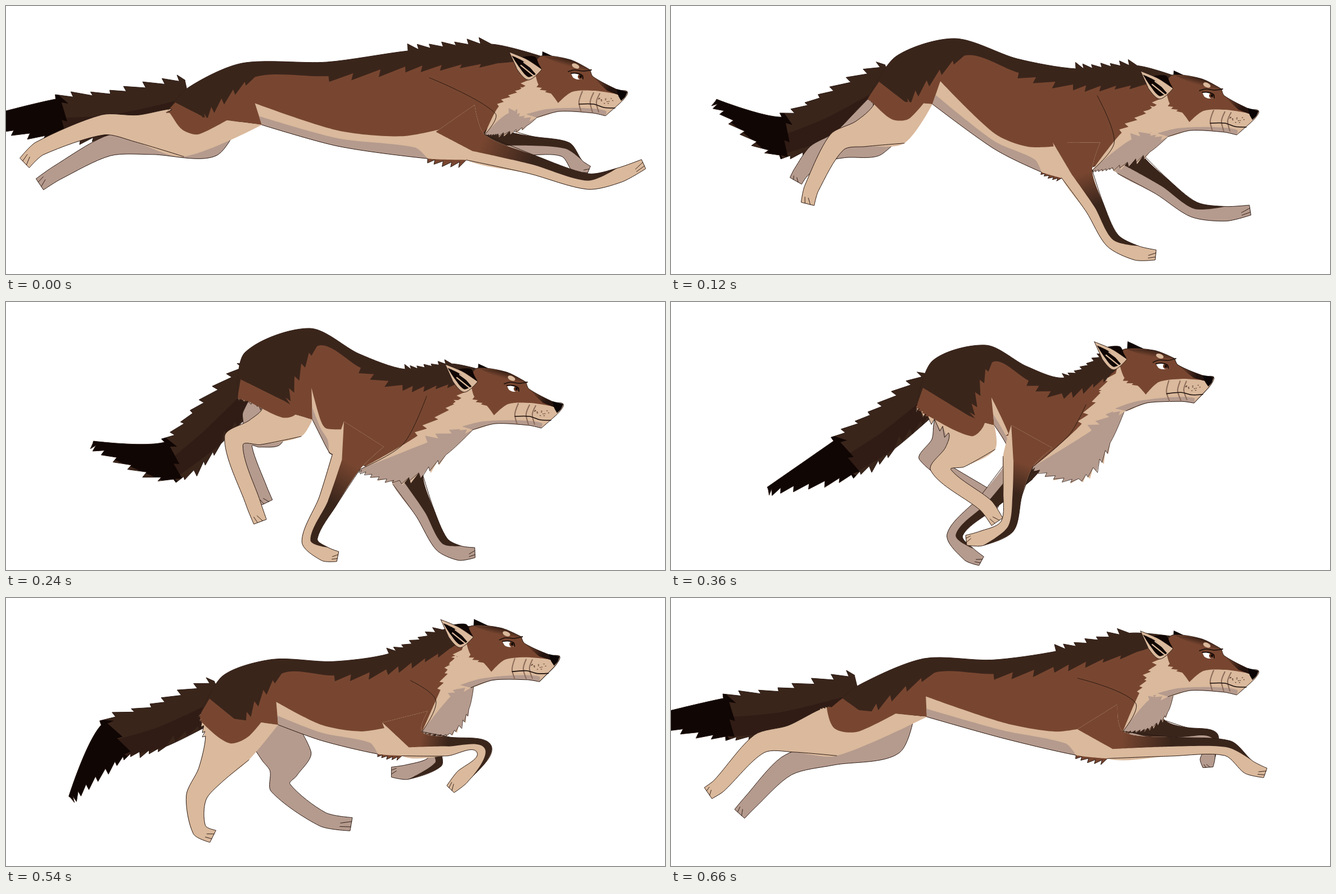
Write an HTML page with a canvas that moves like this. It is 1172x478 px and loops after 0.72 s.

```html
<!DOCTYPE html>
<html lang="en">
<head>
<meta charset="utf-8">
<title>Running wolf</title>
<style>
html, body { margin: 0; width: 100%; height: 100%; overflow: hidden; background: #fff; }
canvas { display: block; }
</style>
</head>
<body>
<canvas id="stage" width="1172" height="478"></canvas>
<script>
const ctx = document.getElementById('stage').getContext('2d');
const BROWN = '#784630', DARK = '#3a251b', CREAM = '#dab99c', SHADE = '#b59b8e', BLACK = '#100604', LINE = '#2b1a13';
const STEP = 60, STEPS = 12;

const parse = row => row.split(' ').map(p => p.split(',').map(Number));
const parseAll = rows => Object.fromEntries(Object.entries(rows).map(([name, row]) => [name, parse(row)]));

// A joint's path through the stride: seven keys, the first six two steps apart.
const body = parseAll({
  rump: '285,190 350,165 412,170 437,185 395,195 300,215 285,195',
  hip: '325,145 400,90 425,90 465,105 425,125 350,150 335,155',
  loin: '420,102 505,58 540,47 560,77 500,97 455,118 450,108',
  withers: '715,80 720,112 710,120 700,135 690,102 675,100 685,95',
  belly: '590,250 575,255 560,240 600,262 590,252 540,257 590,250',
  groin: '455,212 465,175 545,210 575,220 525,232 450,218 455,212',
  ruff: '875,228 785,288 700,318 725,315 770,258 808,232 848,232',
  eye: '1017,126 957,160 903,155 875,115 878,83 917,88 957,103'
});
const tail = parseAll({
  bend: '90,200 195,232 290,283 305,278 255,265 125,242 95,213',
  tip: '-60,205 80,168 155,250 172,332 190,380 25,312 -50,215'
});
const nearFore = parseAll({
  elbow: '835,252 722,300 605,285 617,285 700,255 740,268 790,262',
  wrist: '1035,313 785,418 540,425 598,400 808,305 880,248 990,268',
  toe: '1134,282 862,444 590,454 525,425 743,362 838,326 1057,312'
});
const farFore = parseAll({
  elbow: '870,242 815,280 715,318 620,300 700,270 805,245 870,245',
  wrist: '995,256 930,363 775,432 505,415 695,320 822,275 960,250',
  toe: '1036,294 1030,364 834,447 552,462 608,312 778,325 955,302'
});
const nearHind = parseAll({
  knee: '305,226 388,210 490,213 535,248 490,272 300,258 280,240',
  hock: '172,212 295,243 405,248 480,300 480,365 192,330 157,260',
  ankle: '60,254 250,325 440,360 560,363 535,440 148,372 85,335',
  toe: '33,280 243,353 452,392 580,392 592,448 134,390 66,348'
});
const farHind = parseAll({
  knee: '350,230 350,228 455,225 505,240 580,270 405,285 375,245',
  hock: '180,250 258,265 420,252 460,280 597,318 345,348 205,300',
  ankle: '90,298 230,298 452,335 555,342 690,350 388,430 140,365',
  toe: '60,318 222,312 463,358 585,360 725,362 445,438 122,385'
});

const mix = (a, b, t) => [a[0] + (b[0] - a[0]) * t, a[1] + (b[1] - a[1]) * t];
const shift = (p, x, y) => [p[0] + x, p[1] + y];
const unit = (a, b) => {
  const len = Math.hypot(b[0] - a[0], b[1] - a[1]) || 1;
  return [(b[0] - a[0]) / len, (b[1] - a[1]) / len];
};
const noise = n => Math.abs(Math.sin(n * 12.9898) * 43758.5453) % 1;

function sample(tracks, step) {
  const exact = step % 2 === 0 || step === STEPS - 1;
  const k = Math.ceil((step - 1) / 2) + (step === STEPS - 1 ? 1 : 0);
  return Object.fromEntries(Object.entries(tracks).map(([name, keys]) => {
    const key = i => keys[(i + keys.length) % keys.length];
    const between = d => 0.5625 * (key(k)[d] + key(k + 1)[d]) - 0.0625 * (key(k - 1)[d] + key(k + 2)[d]);
    return [name, exact ? key(k) : [between(0), between(1)]];
  }));
}

// Offsets a chain of joints to both sides, left of travel first.
function ribbon(joints, widths) {
  const side = sign => joints.map((p, i) => {
    const before = i ? unit(joints[i - 1], p) : [0, 0];
    const after = i < joints.length - 1 ? unit(p, joints[i + 1]) : [0, 0];
    const d = unit([0, 0], [before[0] + after[0], before[1] + after[1]]);
    return shift(p, d[1] * widths[i] * sign, -d[0] * widths[i] * sign);
  });
  return [side(1), side(-1)];
}
const outline = ([front, back]) => [...front, ...back.slice().reverse()];

// Mask per point: '-' corner, '.' smooth, digit = fur leaning ahead, letter = fur leaning back.
function trace(pts, mask, open) {
  const n = pts.length, path = new Path2D();
  const at = i => pts[(i + n) % n];
  const dir = i => {
    const j = i % n;
    if (mask[j] === '-' || (open && (j === 0 || j === n - 1))) return [0, 0];
    return unit(at(j - 1), at(j + 1));
  };
  path.moveTo(...pts[0]);
  for (let i = 0; i < n - (open ? 1 : 0); i++) {
    const a = at(i), b = at(i + 1), len = Math.hypot(b[0] - a[0], b[1] - a[1]);
    const d = unit(a, b), da = dir(i), db = dir(i + 1);
    const c1 = shift(a, da[0] * len * 0.28, da[1] * len * 0.28);
    const c2 = shift(b, -db[0] * len * 0.28, -db[1] * len * 0.28);
    const type = mask[i] || '.';
    if (type === '.' || type === '-') { path.bezierCurveTo(...c1, ...c2, ...b); continue; }
    const ahead = type <= '9';
    const count = ahead ? +type : type.charCodeAt(0) - 96;
    const on = t => mix(mix(mix(a, c1, t), mix(c1, c2, t), t), mix(mix(c1, c2, t), mix(c2, b, t), t), t);
    for (let k = 0; k < count; k++) {
      const height = Math.min(12, len / count * 0.7) * (0.5 + 0.6 * noise(i * 9 + k + 1));
      const tip = on(Math.min(1, Math.max(0, (k + 0.5 + (ahead ? 0.6 : -0.6)) / count)));
      path.lineTo(...shift(tip, d[1] * height, -d[0] * height));
      path.lineTo(...on((k + 1) / count));
    }
  }
  if (!open) path.closePath();
  return path;
}

function fill(pts, mask, color, clip) {
  ctx.save();
  if (clip) ctx.clip(clip);
  ctx.fillStyle = color;
  const path = trace(pts, mask);
  ctx.fill(path);
  ctx.restore();
  return path;
}

function line(pts, mask = '', color = LINE, width = 1) {
  ctx.strokeStyle = color;
  ctx.lineWidth = width;
  ctx.stroke(trace(pts, mask, true));
}

function fade(a, b, from, to) {
  const gradient = ctx.createLinearGradient(...a, ...b);
  gradient.addColorStop(0, from);
  gradient.addColorStop(1, to);
  return gradient;
}

function toes(front, back, heel) {
  for (const t of [0.3, 0.7]) {
    const p = mix(front, back, t);
    line([p, mix(p, heel, 0.35)]);
  }
}

function foreLeg({ elbow, wrist, toe }, withers) {
  const paw = shift(mix(wrist, toe, 0.6), -3, 7);
  return ribbon([mix(elbow, withers, 0.3), elbow, mix(elbow, wrist, 0.5), wrist, paw, toe], [42, 28, 17, 14, 13, 9]);
}

function hindLeg({ knee, hock, ankle, toe }, root) {
  return ribbon([root, knee, mix(knee, hock, 0.55), hock, ankle, toe], [42, 44, 24, 18, 13, 12]);
}

function buildPose(step) {
  const b = sample(body, step), t = sample(tail, step);
  const { rump, loin, withers, belly, groin, ruff, eye } = b;
  const hipJoint = [(rump[0] + loin[0] + groin[0]) / 3, (rump[1] + loin[1] + groin[1]) / 3];
  const nearKnee = sample(nearHind, step);
  const fore = foreLeg(sample(nearFore, step), withers);
  const crown = shift(eye, -55, -33), throat = shift(eye, -62, 62);
  const nape = shift(mix(withers, crown, 0.6), 0, (withers[0] - crown[0]) * 0.08);
  const [elbowFront, elbowBack] = [fore[0][1], fore[1][1]];
  const tailRoot = mix(rump, loin, 0.3);
  const tailMid = shift(mix(tailRoot, t.bend, 0.55), -5, 10);
  return {
    ...b, hipJoint, crown, throat, nape, fore, elbowFront, elbowBack, tailJoints: [tailRoot, tailMid, t.bend, t.tip],
    knee: nearKnee.knee,
    hind: hindLeg(nearKnee, hipJoint),
    farHind: hindLeg(sample(farHind, step), hipJoint),
    farFore: foreLeg(sample(farFore, step), withers),
    mid: shift(mix(loin, withers, 0.5), 3, 9),
    groinTip: mix(groin, loin, 0.35),
    armpit: mix(elbowBack, withers, 0.3),
    bellyFront: shift(mix(belly, elbowBack, 0.7), 0, 5),
    ruffBack: shift(mix(shift(eye, -95, 20), ruff, 0.5), -22, -8)
  };
}

function drawTail({ tailJoints }) {
  const mask = '-57--ce-';
  const [under, over] = ribbon(tailJoints, [32, 37, 34, 2]);
  const shape = outline([under, over]);
  const path = fill(shape, mask, DARK);
  fill([...tailJoints.slice(0, 3), under[2], under[1], under[0]], '-.--7-', '#301c15', path);
  const [low, high] = ribbon(tailJoints, [40, 46, 46, 14]);
  fill([low[2], low[3], high[3], high[2]], '---4', BLACK, path);
  line(shape, mask);
}

function drawFore(leg, coat, upper) {
  const [front, back] = leg, shape = outline(leg), mask = '-....--....-';
  const path = fill(shape, mask, coat);
  const stripe = [...front.slice(0, 5), mix(front[3], back[3], 0.45), mix(front[2], back[2], 0.5), mix(front[1], back[1], 0.65), back[0]];
  fill(stripe, '-...-..--', fade(front[1], front[2], upper, DARK), path);
  line(shape.slice(1, 11), mask.slice(1));
  toes(front[5], back[5], back[4]);
}

function drawFarHind({ farHind: leg }) {
  const mask = '-....--....-', shape = outline(leg);
  fill(shape, mask, SHADE);
  line(shape, mask);
  toes(leg[0][5], leg[1][5], leg[1][4]);
}

function drawTorso(p) {
  const mask = '-...g.--.5..-';
  const shape = [p.rump, p.hip, p.loin, p.mid, p.withers, p.nape, p.crown, p.throat,
    mix(p.ruff, p.fore[0][0], 0.3), p.elbowBack, p.bellyFront, p.belly, p.groin];
  const path = fill(shape, mask, BROWN);
  const high = shift(p.belly, 0, -28), highFront = shift(mix(p.belly, p.elbowBack, 0.5), 0, -30);
  fill([p.groinTip, high, highFront, p.armpit, p.elbowBack, p.bellyFront, p.belly, p.groin], '-..--..-', CREAM, path);
  fill([mix(p.groinTip, p.groin, 0.6), mix(high, p.belly, 0.5), mix(highFront, p.bellyFront, 0.5), p.bellyFront, p.belly, p.groin], '-..-.-', SHADE, path);
  line(shape, mask);
  return path;
}

function drawRuff(p) {
  const front = shift(mix(p.throat, p.ruff, 0.5), 12, 5), top = shift(p.eye, -95, 20);
  const path = fill([top, p.throat, front, p.ruff, p.elbowFront, p.ruffBack], '--57-e', CREAM);
  fill([p.throat, front, p.ruff, p.elbowFront, mix(p.ruffBack, front, 0.35)], '-57-e', SHADE, path);
  line([p.throat, front, p.ruff, p.elbowFront], '-57-', LINE, 0.8);
}

function drawHaunch(p, clip) {
  const [front, back] = p.hind, mask = '-....--...e-';
  const shape = [p.groin, ...front.slice(1), ...back.slice(1).reverse(), p.rump];
  fill(shape, mask, CREAM);
  line(shape.slice(1), mask.slice(1));
  toes(front[5], back[5], back[4]);
  fill([p.groinTip, mix(p.hipJoint, front[1], 0.6), mix(p.hipJoint, p.knee, 0.9), mix(p.rump, back[1], 0.4), p.rump], '-..5-', BROWN);
  const saddle = [shift(p.nape, 12, 34), shift(p.withers, -5, 28), shift(p.mid, 3, 25),
    shift(mix(p.loin, p.mid, 0.15), 0, 25), mix(p.hipJoint, p.knee, 0.48), mix(p.rump, p.hip, 0.4)];
  fill([p.rump, p.hip, p.loin, p.mid, p.withers, p.nape, p.crown, ...saddle], '-...g.-53.6--', DARK, clip);
}

const head = parseAll({
  skull: '-78,-22 -65,-37 -13,-30 22,-12 27,0 72,24 88,27 82,40 65,56 49,70 27,65 -33,62 -73,73 -103,65 -110,40 -85,5',
  mask: '-78,-22 -65,-37 -13,-30 22,-12 27,0 72,24 74,32 30,25 -10,27 -35,47 -48,30 -70,14',
  crown: '-60,-36 -13,-30 22,-12 4,-14 -25,-20',
  bridge: '27,1 74,24 73,33 52,25',
  nose: '69,22 88,27 84,36 77,43 72,34',
  jaw: '-92,67 -55,58 10,56 50,61 49,70 27,65 -33,62 -73,73',
  eye: '-12,-6 -2,-6 8,-2 9,4 0,5 -8,2',
  brow: '-17,-9 -6,-12 10,-10 24,-12',
  mouth: '2,49 28,49 46,55 66,56',
  ear: '-122,-44 -91,-31 -64,-13 -88,6 -108,-13',
  farEar: '-64,-28 -63,-45 -35,-32'
});

function drawHead({ eye, withers }) {
  const slope = (eye[1] - withers[1]) / (eye[0] - withers[0]);
  ctx.save();
  ctx.translate(...eye);
  fill(head.farEar, '---', BLACK);
  ctx.save();
  ctx.rotate(Math.min(0, slope * 0.8));
  drawFace();
  ctx.restore();
  drawEar(head.ear);
  ctx.restore();
}

function drawFace() {
  const mask = '-..-....--..3cc.';
  const path = fill(head.skull, mask, CREAM);
  fill(head.jaw, '-...-..-', SHADE, path);
  fill(head.mask, '-..-.--..-3.', BROWN, path);
  fill(head.crown, '-.-.', fade([-8, -31], [-12, -17], '#2c1911', BROWN), path);
  fill(head.bridge, '----', fade([28, 4], [60, 20], BROWN, '#24130e'), path);
  line(head.skull.slice(0, 13), mask);
  for (const x of [2, 22, 33]) line([[x + 6, 26 + x / 8], [x, 45], [x + 4, 63]], '', '#8b6b5a', 2);
  line(head.mouth, '', '#1a0d09', 1.6);
  ctx.fillStyle = '#4b3024';
  for (let i = 0; i < 14; i++) ctx.fillRect(36 + 27 * noise(i + 1), 37 + 13 * noise(i + 40), 2.2, 1);
  fill(head.nose, '--.-.', '#0b0506');
  const eyePath = fill(head.eye, '-..-..', '#fff');
  ctx.save();
  ctx.clip(eyePath);
  disc(5, 0, 5, 5, '#6b3b26');
  disc(5, 0, 2.3, 2.3, '#140a07');
  ctx.restore();
  line(head.eye.slice(0, 4), '', '#160b08', 1.8);
  line(head.brow, '', LINE, 2);
  disc(-4, -19, 7, 4, CREAM);
}

function disc(x, y, rx, ry, color) {
  ctx.fillStyle = color;
  ctx.beginPath();
  ctx.ellipse(x, y, rx, ry, 0.45, 0, 7);
  ctx.fill();
}

function drawEar([tip, top, front, low, rear]) {
  const crest = shift(top, 14, -5);
  fill([mix(tip, top, 0.7), crest, mix(crest, front, 0.6), front], '-..-', BLACK);
  const path = fill([tip, top, front, low, rear], '-.-.-', CREAM);
  fill([mix(tip, low, 0.13), mix(top, rear, 0.25), mix(front, low, 0.45), mix(low, top, 0.15), mix(rear, top, 0.22)], '-.-.', BLACK, path);
  for (const t of [0.3, 0.6]) line([mix(front, low, t), mix(top, rear, t)], '', CREAM, 2.2);
  line([tip, top, front, low, rear, tip], '-.-.--');
}

function draw(step) {
  const pose = buildPose(step);
  ctx.fillStyle = '#fff';
  ctx.fillRect(0, 0, 1172, 478);
  drawTail(pose);
  drawFarHind(pose);
  drawFore(pose.farFore, SHADE, DARK);
  const torso = drawTorso(pose);
  drawRuff(pose);
  drawFore(pose.fore, CREAM, BROWN);
  line([shift(pose.withers, 38, 48), mix(pose.ruffBack, pose.elbowFront, 0.25), pose.elbowFront]);
  drawHaunch(pose, torso);
  drawHead(pose);
}

ctx.lineJoin = ctx.lineCap = 'round';
const start = performance.now();
let shown = -1;
function tick() {
  const step = Math.floor(Math.max(0, performance.now() - start) / STEP) % STEPS;
  if (step !== shown) draw(shown = step);
  requestAnimationFrame(tick);
}
tick();
</script>
</body>
</html>
```
